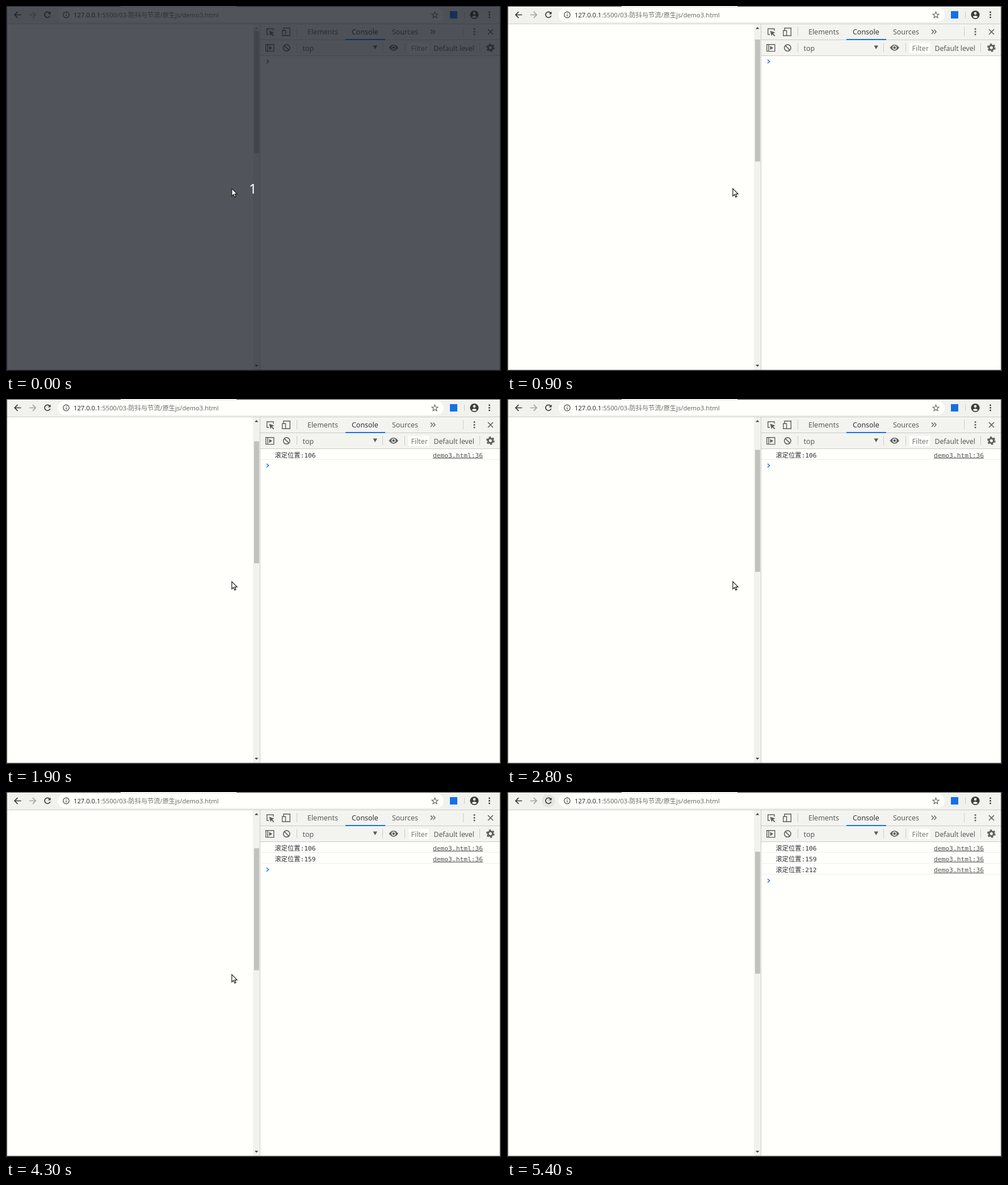
An HTML page that plays this animation: 872 px wide and 642 px high, repeating every 5700 ms.

```html
<!DOCTYPE html>
<html lang="zh">
<head>
<meta charset="utf-8">
<title>Scroll demo</title>
<style>
  html, body { margin: 0; width: 100%; height: 100%; overflow: hidden; background: #fffffc; }
  svg { display: block; width: 872px; height: 642px; }
  text { font-family: "Noto Sans", "Noto Sans CJK SC", sans-serif; white-space: pre; }
  .ui { font-size: 12.45px; fill: #5a5a5a; }
  .url { font-size: 11.2px; fill: #6a6a68; }
  .log text { font: 11.25px "DejaVu Sans Mono", "Noto Sans CJK SC", monospace; fill: #303036; }
  .log .link { fill: #545454; text-decoration: underline; }
  .line { fill: none; stroke: #5f5f5d; stroke-width: 1.4; }
  .dark { fill: none; stroke: #3c3c3c; stroke-width: 1.7; }
  .sep { fill: none; stroke: #cbcbc8; }
</style>
</head>
<body>
<svg viewBox="0 0 872 642">
  <rect width="872" height="642" fill="#3c3b3a"/>
  <rect x="2" y="1" width="868" height="639" fill="#fffffc"/>
  <path d="M2 1H870V31H2zM202 0H406V1H202z" fill="#f1f1ee"/>
  <path class="sep" d="M2 31.5H870"/>

  <!-- browser bar -->
  <circle id="hover" cx="73" cy="15.5" r="11.5" fill="#e4e4e1"/>
  <path class="dark" d="M26.5 15.5H15.5M20.5 10.2L15.2 15.5L20.5 20.8"/>
  <path class="dark" style="stroke:#a5a5a3" d="M41 15.5H52M47 10.2L52.3 15.5L47 20.8"/>
  <path class="dark" d="M77 12.2A5 5 0 1 0 77.8 17"/>
  <path d="M78.6 9.8V14.6H73.8z" fill="#3c3c3c"/>
  <rect x="91" y="3" width="680" height="25" rx="12.5" fill="#fffffc"/>
  <circle class="line" cx="106" cy="15.5" r="5.2" stroke-width="1.2"/>
  <path class="line" d="M106 14.8V18.6M106 12.2V13.6"/>
  <text class="url" x="119" y="19.5"><tspan fill="#2e2e2e">127.0.0.1</tspan>:5500/03-防抖与节流/原生js/demo3.html</text>
  <path class="line" style="stroke-width:1.1" d="M755.5 10.2L757 14L761 14.2L757.9 16.8L758.9 20.7L755.5 18.5L752.1 20.7L753.1 16.8L750 14.2L754 14z"/>
  <rect x="782" y="9" width="13" height="13" fill="#1371e6"/>
  <path class="sep" d="M807.5 10V21"/>
  <circle cx="825" cy="15.5" r="7.6" fill="#3c3c3c"/>
  <g fill="#f1f1ee"><circle cx="825" cy="12.9" r="2.3"/><path d="M820.4 19.3Q825 14.8 829.6 19.3Q825 23.3 820.4 19.3z"/></g>
  <g fill="#3c3c3c"><circle cx="851.5" cy="11" r="1.4"/><circle cx="851.5" cy="15.5" r="1.4"/><circle cx="851.5" cy="20" r="1.4"/></g>

  <!-- page scrollbar -->
  <rect x="435" y="32" width="12" height="608" fill="#f1f1ee"/>
  <path id="up" d="M438 40.5H444.4L441.2 37z"/>
  <path d="M438 631H444.4L441.2 634.5z" fill="#474747"/>
  <rect id="thumb" x="437" y="44" width="9" height="214.5" fill="#c1c1be"/>

  <!-- developer tools -->
  <rect x="448" y="32" width="422" height="56" fill="#f3f3f0"/>
  <path class="sep" d="M447.5 32V640M448 59.5H870M448 87.5H870M512.5 37V53M805.5 37V53M512.5 65V81M663.5 65V81M702.5 65V81M834.5 65V81"/>
  <rect x="598" y="58" width="70" height="2" fill="#1474df"/>
  <path class="line" d="M463 50H459.7V40H471V43.5"/>
  <path d="M463.5 43.5L472.5 46.8L468.9 48.4L472.4 52L471 53.3L467.5 49.8L466 53z" fill="#5f5f5d"/>
  <path class="line" d="M489 43V38.7H500.3V52.3H492M486.7 43.2H492.5V52.3H486.7z"/>
  <g class="ui">
    <text x="531" y="50">Elements</text>
    <text x="609" y="50" fill="#333">Console</text>
    <text x="680" y="50">Sources</text>
    <text x="522.5" y="78.5">top</text>
    <text x="753.5" y="78.5" style="font-size:12.25px">Default level</text>
  </g>
  <path class="line" d="M748 41.5L751.5 45.3L748 49.1M752.5 41.5L756 45.3L752.5 49.1"/>
  <g fill="#5f5f5d"><circle cx="825" cy="40.5" r="1.5"/><circle cx="825" cy="45.3" r="1.5"/><circle cx="825" cy="50.1" r="1.5"/></g>
  <path class="line" style="stroke-width:1.6" d="M849 41L858 50M858 41L849 50"/>
  <path class="line" d="M457.7 67.7H471.8V79.6H457.7zM461 67.7V79.6"/>
  <path d="M463.5 70.2V77.2L469.2 73.7z" fill="#5f5f5d"/>
  <circle class="line" cx="494.3" cy="73.6" r="5.7" style="stroke-width:1.6"/>
  <path class="line" style="stroke-width:1.6" d="M490.3 69.6L498.3 77.6"/>
  <path d="M646.5 69.5H654L650.2 76z" fill="#5a5a5a"/>
  <path d="M674.5 73.3Q682.7 62.5 691 73.3Q682.7 84 674.5 73.3z" fill="#5f5f5d"/>
  <circle cx="682.7" cy="73.3" r="3" fill="#5f5f5d" stroke="#f3f3f0" stroke-width="1.4"/>
  <rect x="709" y="65" width="36" height="18" fill="#fffffc"/>
  <svg x="709" y="65" width="33.5" height="18"><text class="ui" x="4.5" y="13.5" style="fill:#777">Filter</text></svg>
  <circle cx="853.3" cy="73.3" r="6.2" fill="none" stroke="#5f5f5d" stroke-width="2.4" stroke-dasharray="3.25 3.24"/>
  <circle cx="853.3" cy="73.3" r="4.1" fill="none" stroke="#5f5f5d" stroke-width="3"/>
  <g class="log" id="log"></g>
  <path id="prompt" fill="none" stroke="#267fe0" stroke-width="1.6" d="M459 94.3L462.7 97.5L459 100.7"/>

  <!-- countdown -->
  <g id="count">
    <rect width="872" height="642" fill="#171b25" fill-opacity=".75"/>
    <text x="428" y="330" font-size="24" fill="#fff">1</text>
  </g>
  <path id="mouse" d="M.8 1.2V14.2L3.8 11.5L5.9 16.1L8 15.2L6 10.7H10.1z" fill="#fff" stroke="#1c1c1c" stroke-width="1.2"/>
</svg>
<script>
const $ = id => document.getElementById(id);
const LOOP = 5700, PITCH = 19.2;
const logs = [[1900, 106], [3700, 159], [5400, 212]];
// time of each change, thumb top
const scroll = [[0, 44], [900, 59], [1200, 69], [1300, 74.5], [2600, 79], [2700, 87], [2800, 89.5], [4300, 99], [4400, 105]];
const path = [[0, 397, 320], [4600, 368, 291], [4700, 262, 186], [4800, 153, 82], [4900, 103, 34], [5000, 77, 9], [5100, 69, 2]];

const at = (keys, t) => keys.filter(k => k[0] <= t).pop();
const show = (el, on) => el.setAttribute("visibility", on ? "visible" : "hidden");

$("log").innerHTML = logs.map(([, pos], i) => {
  const y = 102.5 + i * PITCH, rule = Math.round(106 + i * PITCH) + .5;
  return `<g><text x="473.5" y="${y}">滚定位置:${pos}</text>
    <text class="link" x="752" y="${y}">demo3.html:36</text>
    <path d="M449 ${rule}H870" stroke="#eeeeeb"/></g>`;
}).join("");
const rows = [...$("log").children];

function draw(now) {
  const t = now % LOOP;
  const [, x, y] = at(path, t);
  $("mouse").setAttribute("transform", `translate(${x} ${y})`);
  show($("mouse"), t < 5200);
  show($("hover"), t >= 5000);
  show($("count"), t < 100);
  $("thumb").setAttribute("y", at(scroll, t)[1]);
  $("up").setAttribute("fill", t < 900 ? "#a5a5a3" : "#474747");
  logs.forEach(([start], i) => show(rows[i], t >= start));
  const n = logs.filter(l => l[0] <= t).length;
  $("prompt").setAttribute("transform", `translate(0 ${n * 19.5})`);
}

const start = performance.now();
(function tick() {
  draw(performance.now() - start);
  requestAnimationFrame(tick);
})();
</script>
</body>
</html>
```
